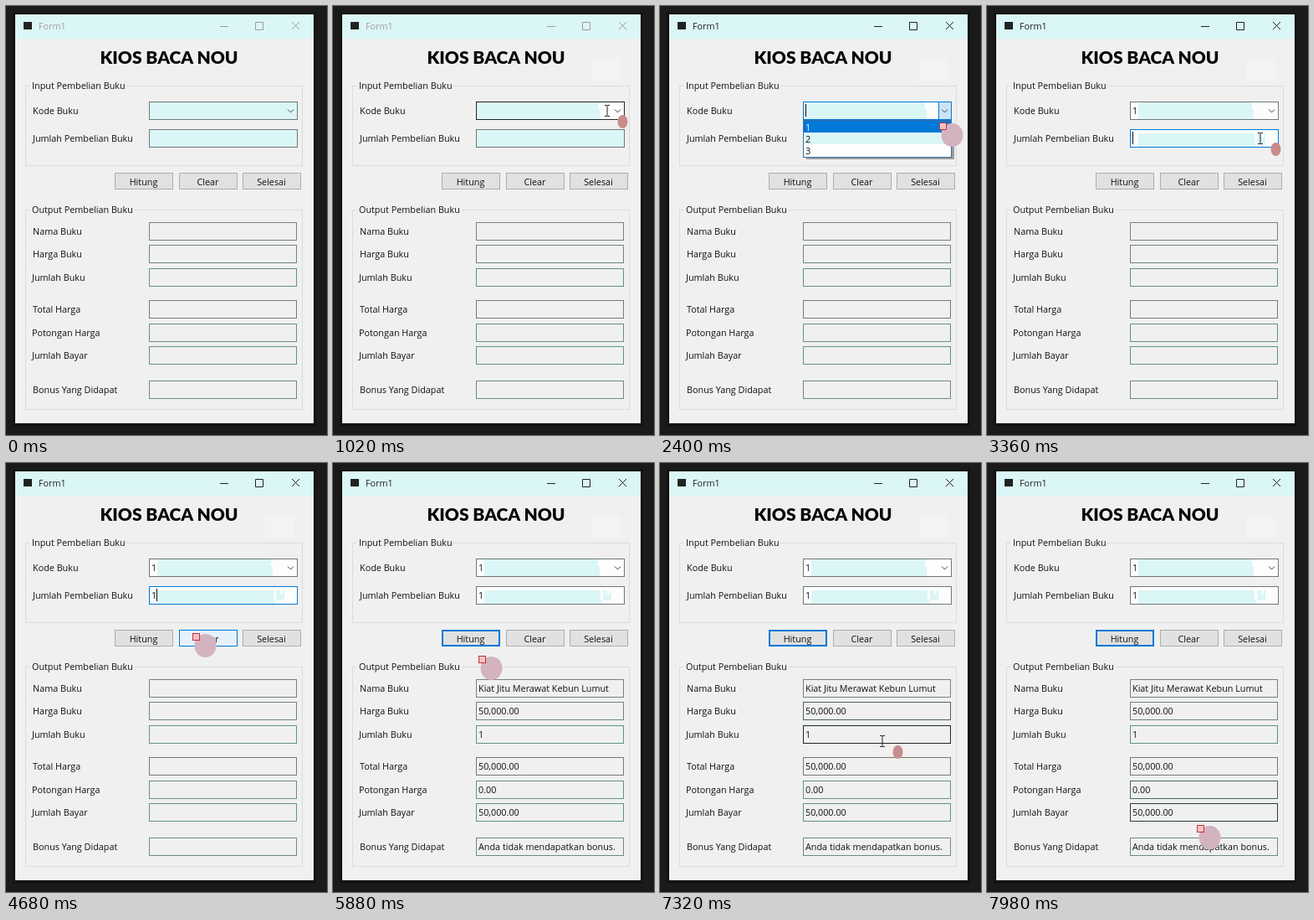
Recreate the animation shown at these times as an HTML page. Size 384 px wide and 512 px high, loop 8 s.

```html
<!DOCTYPE html>
<html lang="id">
<head>
<meta charset="utf-8">
<title>Form1</title>
<style>
  html, body { margin: 0; width: 100%; height: 100%; overflow: hidden; background: #1a1a1a; }
  svg { display: block; width: 100vw; height: 100vh; }
  text { font: 10.8px "Open Sans", "Noto Sans", sans-serif; fill: #111; white-space: pre; }
  .title { font: 900 21px Lato, sans-serif; fill: #080808; text-anchor: middle; }
  .mid { text-anchor: middle; }
  rect { shape-rendering: crispEdges; }
</style>
</head>
<body>
<svg id="stage" viewBox="0 0 384 512"></svg>
<script>
const LOOP = 8000, STEP = 60;
const BLUE = '#0078d7', CYAN = '#dbf6f6', FACE = '#f0f0f0';

const rect = (x, y, w, h, fill, more = '') =>
  `<rect x="${x}" y="${y}" width="${w}" height="${h}" fill="${fill}" ${more}/>`;
const frame = (x, y, w, h, fill, stroke, more = '') =>
  rect(x + .5, y + .5, w - 1, h - 1, fill, `stroke="${stroke}" ${more}`);
const text = (x, y, s, more = '') => `<text x="${x}" y="${y}" ${more}>${s}</text>`;
const group = (id, body) => `<g id="${id}">${body}</g>`;

const fields = [
  ['Nama Buku', 258, 'Kiat Jitu Merawat Kebun Lumut', '#7a7f7e'],
  ['Harga Buku', 285, '50,000.00', '#6c8582'],
  ['Jumlah Buku', 313, '1', '#5f9289'],
  ['Total Harga', 351, '50,000.00', '#80766f'],
  ['Potongan Harga', 379, '0.00', '#64908a'],
  ['Jumlah Bayar', 406, '50,000.00', '#5f9289'],
  ['Bonus Yang Didapat', 447, 'Anda tidak mendapatkan bonus.', '#6c8a86'],
];
const buttons = [['hitung', 'Hitung', 130], ['clear', 'Clear', 207], ['selesai', 'Selesai', 283]];
const inputs = [[171, 114, 178, 22], [171, 147, 178, 22], ...fields.map(f => [171, f[1], 177, 22])];

const groupBox = (y, h, label, gap) =>
  frame(23, y, 332, h, 'none', '#dcdcdc') + rect(28, y - 2, gap, 5, FACE) + text(31, y + 4, label);

const fieldRow = ([label, y, , stroke]) =>
  text(label.startsWith('J') || label.startsWith('P') ? 31 : 32, y + 14.5, label) +
  frame(171, y, 177, 22, FACE, stroke);

const listItem = (n, y, fill, id) =>
  rect(172, y, 176, 15, fill, `id="${id}"`) + text(174, y + 11.5, n, `id="${id}Text"`);

const caret = (id, x, y) => rect(x, y, 1, 15, '#111', `id="${id}"`);

document.getElementById('stage').innerHTML =
  rect(0, 0, 384, 512, '#1a1a1a') +
  rect(8, 8, 363, 494, '#131313') +
  rect(11, 10, 357, 488, FACE) +
  rect(11, 10, 357, 29, CYAN) +
  rect(21, 19, 10, 9, '#222') +
  text(39, 28, 'Form1', 'id="caption"') +
  `<path id="controls" fill="none" d="M256 24.5h10M298.5 19.5h9v9h-9zM342 19l9 9M351 19l-9 9"/>` +
  text(195, 69, 'KIOS BACA NOU', 'class="title"') +
  rect(310, 63, 34, 27, '#f3f3f3', 'id="smudge"') +
  groupBox(95, 96, 'Input Pembelian Buku', 116) +
  text(32, 129, 'Kode Buku') +
  text(32, 162, 'Jumlah Pembelian Buku') +
  frame(171, 114, 178, 22, CYAN, '#6e7877', 'id="combo"') +
  group('comboRight', rect(319, 115, 29, 20, '#fdfdfd') + rect(317, 115, 3, 8, '#fdfdfd')) +
  rect(172, 115, 9, 20, '#fdfdfd', 'id="comboLeft"') +
  rect(174, 117, 7, 15, BLUE, 'id="selection"') +
  text(174, 129, '1', 'id="code"') +
  caret('comboCaret', 174, 117) +
  frame(333, 114, 16, 22, '#cce4f7', BLUE, 'id="drop"') +
  `<path d="M337 123.5l3.5 3.5 3.5-3.5" fill="none" stroke="#444"/>` +
  frame(171, 147, 178, 22, CYAN, '#6e7877', 'id="amountBox"') +
  group('amountPatches', rect(172, 148, 9, 20, '#fdfdfd') + rect(181, 148, 167, 4, '#fdfdfd') +
    rect(333, 148, 15, 20, '#fdfdfd') + rect(320, 152, 3, 12, '#fdfdfd') +
    rect(328, 152, 3, 5, '#fdfdfd') + rect(322, 164, 11, 4, '#fdfdfd')) +
  text(174, 162, '1', 'id="amount"') +
  caret('amountCaret', 174, 150) +
  buttons.map(([id, label, x]) => frame(x, 199, 70, 20, '#e1e1e1', '#adadad', `id="${id}"`) +
    text(x + 34.5, 213.5, label, 'class="mid"')).join('') +
  rect(131, 200, 68, 18, 'none', `id="focus" stroke="${BLUE}" stroke-width="2"`) +
  groupBox(243, 239, 'Output Pembelian Buku', 125) +
  fields.map(fieldRow).join('') +
  group('output', fields.map(f => text(174, f[1] + 14.5, f[2])).join('')) +
  inputs.map((r, i) => frame(...r, 'none', '#1c2826', `id="hover${i}"`)).join('') +
  group('list', rect(175, 140, 177, 43, '#000', 'opacity=".35"') +
    frame(171, 136, 178, 45, '#fff', '#3a6ea5') +
    listItem(1, 137, '#fff', 'item1') + listItem(2, 151, CYAN, 'item2') + listItem(3, 165, '#fff', 'item3')) +
  group('arrow', '<ellipse cx="15.5" cy="15" rx="13" ry="14" fill="#d3b3c0"/>' +
    frame(0, 0, 9, 9, '#f3c3c3', '#c8303c')) +
  group('beam', '<ellipse cx="18.5" cy="13" rx="6" ry="8" fill="#c98c8c"/>' +
    '<path d="M-3 -6.5h2.5l.5 .5l.5-.5h2.5M0-6v12M-3 6.5h2.5l.5-.5l.5 .5h2.5" fill="none" stroke="#222"/>');

const $ = Object.fromEntries([...document.querySelectorAll('[id]')].map(n => [n.id, n]));
const show = (node, on) => node.setAttribute('visibility', on ? 'visible' : 'hidden');
const between = (t, a, b) => t >= a && t < b;
const inside = ([x, y], [rx, ry, w, h]) => x >= rx && x < rx + w && y >= ry && y < ry + h;

// Pointer stops: time, x, y
const route = [
  [420, 346, 56], [600, 312, 62], [840, 318, 98], [1020, 328, 125], [1080, 337, 126],
  [1260, 337, 126], [1920, 338, 128], [2100, 337, 129], [2400, 334, 139], [2640, 334, 139],
  [2820, 333, 143], [3120, 330, 150], [3360, 327, 158], [4260, 327, 158], [4680, 223, 203],
  [4860, 160, 209], [5580, 160, 209], [5880, 174, 230], [6060, 196, 256], [6420, 245, 276],
  [6900, 258, 291], [7140, 262, 303], [7260, 264, 322], [7320, 266, 332], [7620, 261, 366],
  [7980, 251, 432],
];

function pointerAt(t) {
  if (t < route[0][0]) return [420, 56];
  const i = route.findIndex(p => p[0] > t);
  if (i < 0) return route[route.length - 1].slice(1);
  const [t0, x0, y0] = route[i - 1], [t1, x1, y1] = route[i];
  const k = (t - t0) / (t1 - t0);
  return [x0 + (x1 - x0) * k, y0 + (y1 - y0) * k];
}

const listOpen = t => between(t, 1440, 2760);
const overInput = (t, i) => !listOpen(t) && inside(pointerAt(t), inputs[i]);

// Borders darken at once and fade after the pointer leaves.
function hoverLevel(t, i) {
  for (let back = 0; back < 240; back += STEP)
    if (t >= back && overInput(t - back, i)) return 1 - back / 300;
  return 0;
}

function draw(time) {
  const t = Math.floor(time / STEP) * STEP;
  const at = pointerAt(t), open = listOpen(t);
  const active = t >= 1260, comboFocus = between(t, 1260, 3300), amountFocus = between(t, 3300, 5100);

  $.caption.style.fill = active ? '#222' : '#a99ca0';
  $.controls.setAttribute('stroke', active ? '#222' : '#a3989b');
  show($.smudge, t >= 840);

  const onDrop = between(t, 1080, 2760);
  $.combo.setAttribute('stroke', comboFocus ? BLUE : '#6e7877');
  show($.comboRight, t >= 1020);
  show($.comboLeft, t >= 2760);
  show($.code, t >= 2760);
  show($.selection, between(t, 2760, 3300));
  $.code.style.fill = between(t, 2760, 3300) ? '#fff' : '#111';
  show($.comboCaret, between(t, 1320, 2760));
  show($.drop, onDrop);

  show($.list, open);
  const picked = at[1] > 136;
  $.item1.setAttribute('fill', picked ? BLUE : '#fff');
  $.item1Text.style.fill = picked ? '#fff' : '#111';
  // Hidden parents do not hide children with their own visibility, so the list keeps none inside.

  $.amountBox.setAttribute('stroke', amountFocus ? BLUE : '#6e7877');
  show($.amountPatches, t >= 3300);
  show($.amount, t >= 4260);
  $.amountCaret.setAttribute('x', t >= 4260 ? 180 : 174);
  show($.amountCaret, between(t, 3300, 3840) || between(t, 4260, 4800));

  for (const [id, , x] of buttons) {
    const hot = inside(at, [x, 199, 70, 20]);
    const pressed = hot && between(t, 5100, 5220);
    $[id].setAttribute('fill', pressed ? '#cce4f7' : hot ? '#e5f1fb' : '#e1e1e1');
    $[id].setAttribute('stroke', hot ? BLUE : '#adadad');
  }
  show($.focus, t >= 5100);
  show($.output, t >= 5220);

  inputs.forEach((_, i) => {
    const focused = i === 0 ? comboFocus : i === 1 && amountFocus;
    $['hover' + i].setAttribute('opacity', focused ? 0 : hoverLevel(t, i));
  });

  const beam = inputs.some((_, i) => overInput(t, i)) && !(at[1] < 137 && at[0] > 333);
  const move = `translate(${at.map(Math.round).join(' ')})`;
  $.arrow.setAttribute('transform', move);
  $.beam.setAttribute('transform', move);
  show($.arrow, t >= 420 && !beam);
  show($.beam, t >= 420 && beam);
}

const start = performance.now();
function tick() {
  draw((performance.now() - start) % LOOP);
  requestAnimationFrame(tick);
}
draw(0);
requestAnimationFrame(tick);
</script>
</body>
</html>
```
